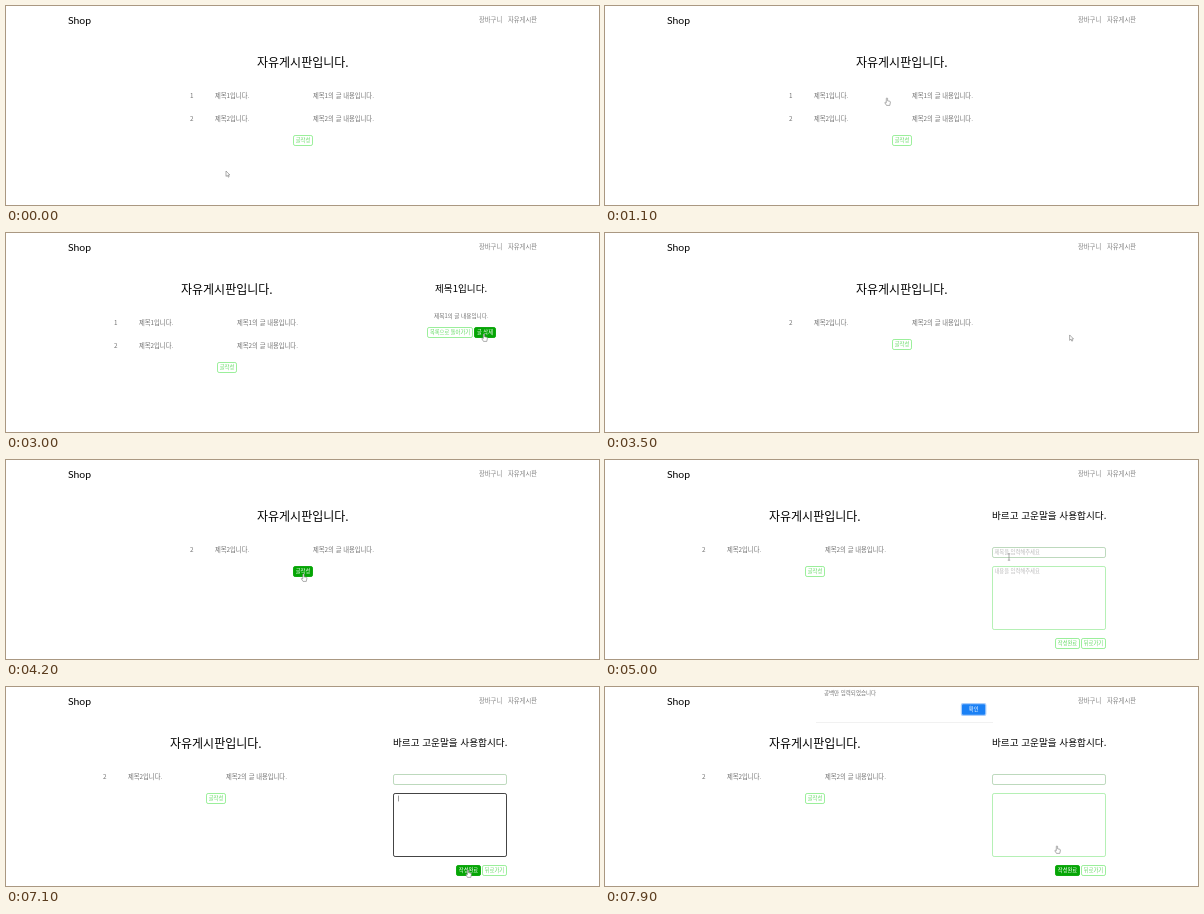
An HTML page that plays this animation: 593 by 199 pixels, repeating every 8 s.

```html
<!DOCTYPE html>
<html lang="ko">
<head>
<meta charset="utf-8">
<style>
  html, body { margin: 0; width: 100%; height: 100%; overflow: hidden; background: #fff; }
  svg { display: block; width: 593px; height: 199px; }
  text { font-family: "Noto Sans CJK KR", "Noto Sans CJK", sans-serif; fill: #707070; white-space: pre; }
  .head { fill: #000; font-weight: 500; }
  .brand { font-family: Lato, "Open Sans", sans-serif; fill: #000; }
  .nav { fill: #808080; }
  .hint { fill: #bbb; }
  .btn rect { fill: #fff; stroke: #90ee90; stroke-width: .9; }
  .btn text { fill: #62da62; text-anchor: middle; }
  .btn.on rect { fill: #05a505; stroke: #05a505; }
  .btn.on text { fill: #fff; }
  .field { fill: #fff; stroke: #a8eea8; stroke-width: .85; }
  .field.gray { stroke: #b2d2b2; }
  .field.focus { stroke: #444; stroke-width: 1; }
  .cursor path { fill: #fff; stroke: #777; stroke-width: .6; stroke-linejoin: round; }
</style>
</head>
<body>
<svg id="stage" viewBox="0 0 593 199"></svg>
<script>
const LOOP = 8000;
const stage = document.getElementById('stage');

function el(parent, tag, attrs = {}) {
  const node = document.createElementNS('http://www.w3.org/2000/svg', tag);
  for (const k in attrs) node.setAttribute(k, attrs[k]);
  return parent.appendChild(node);
}
const group = (parent, cls = '') => el(parent, 'g', { class: cls });
const show = (node, on) => node.setAttribute('visibility', on ? 'inherit' : 'hidden');

// Text placed by its left edge and vertical centre.
function label(parent, x, cy, size, str, cls = '') {
  const t = el(parent, 'text', { x, y: cy + size * 0.37, 'font-size': size, class: cls });
  t.textContent = str;
  return t;
}

function button(parent, x, y, w, str) {
  const g = group(parent, 'btn');
  el(g, 'rect', { x: x + .5, y: y + .5, width: w - 1, height: 10, rx: 1.6 });
  label(g, x + w / 2, y + 5.5, 5.25, str);
  return { g, x, y, w, h: 11 };
}

function field(parent, x, y, w, h, hint, cls) {
  const box = el(parent, 'rect', { x: x + .5, y: y + .5, width: w - 1, height: h - 1, rx: 1.6, class: cls });
  const text = label(parent, x + 2.5, y + 5.4, 5.3, hint, 'hint');
  const caret = el(parent, 'rect', { x: x + 3, y: y + 2.6, width: .6, height: 5.8, fill: '#555' });
  return { box, text, caret, x, y, w, h };
}

// Header
label(stage, 62, 14.3, 10.4, 'Shop', 'brand');
label(stage, 473, 14, 6.3, '장바구니', 'nav');
label(stage, 502, 14, 6.3, '자유게시판', 'nav');

// List
const list = group(stage);
label(list, 251, 56.5, 12, '자유게시판입니다.', 'head');
const rows = [1, 2].map(n => {
  const g = group(list);
  label(g, 184, 90, 6.3, n);
  label(g, 209, 90, 6.3, `제목${n}입니다.`);
  label(g, 307, 90, 6.3, `제목${n}의 글 내용입니다.`);
  return g;
});
const write = button(list, 287, 129, 20, '글작성');

// Detail
const detail = group(stage);
label(detail, 429, 55, 9.6, '제목1입니다.', 'head');
label(detail, 428, 82.5, 5.65, '제목1의 글 내용입니다.');
const back = button(detail, 421, 94, 46, '목록으로 돌아가기');
const remove = button(detail, 468, 94, 22, '글 삭제');

// Form
const form = group(stage);
label(form, 387, 55, 9.65, '바르고 고운말을 사용합시다.', 'head');
const subject = field(form, 387, 87, 114, 11, '제목을 입력해주세요', 'field gray');
const body = field(form, 387, 106, 114, 64, '내용을 입력해주세요', 'field');
const done = button(form, 450, 178, 25, '작성완료');
const cancel = button(form, 476, 178, 25, '뒤로가기');

// Alert
const alertBox = group(stage);
el(alertBox, 'rect', { x: 211, y: -4, width: 177, height: 40, fill: '#f1f1f1' });
el(alertBox, 'rect', { x: 211, y: -4, width: 177, height: 39, fill: '#fff' });
label(alertBox, 219, 6.3, 5.5, '공백만 입력되었습니다');
el(alertBox, 'rect', { x: 355.8, y: 16, width: 25.6, height: 13, rx: 2, fill: '#a9cdfb' });
el(alertBox, 'rect', { x: 357, y: 17.2, width: 23.2, height: 10.6, rx: 1.2, fill: '#1a80f5' });
label(alertBox, 363.8, 22.4, 5.3, '확인').style.fill = '#fff';

// Pointer
const cursor = group(stage, 'cursor');
const shapes = {
  arrow: 'M0 0V5.4L1.3 4.3L2.2 6.2L3.1 5.8L2.2 4H3.9Z',
  hand: 'M-.7 .3Q0 -.6 .6 .3V2.8L2.9 3.3Q3.5 3.5 3.4 4.3L2.8 7.4H-.5L-2.2 4.7Q-1.8 3.9 -.7 4.7Z',
  beam: 'M-1.2 -3.2H1.2M0 -3.2V3.2M-1.2 3.2H1.2'
};
for (const k in shapes) shapes[k] = el(cursor, 'path', { d: shapes[k] });

// Pointer stops: time, x, y
const stops = [
  [0, 220, 165], [300, 214, 110], [500, 240, 57], [700, 350, 75], [900, 283, 93], [1100, 282, 92],
  [1600, 282, 92], [1800, 150, 85], [1900, 230, 54], [2000, 365, 95], [2300, 440, 120],
  [2500, 481, 128], [2700, 478, 101], [3400, 478, 101], [4000, 297.5, 114], [4300, 297.5, 114],
  [4500, 208, 100], [4700, 320, 58], [4850, 494, 170], [5000, 404, 97], [5400, 404, 97],
  [6000, 463, 177], [6400, 451, 150], [6700, 451, 150], [7000, 462, 183], [7500, 462, 183],
  [7900, 452, 159], [8000, 452, 159]
];

function pointerAt(t) {
  const i = stops.findIndex(s => s[0] > t);
  const [t0, x0, y0] = stops[i - 1], [t1, x1, y1] = stops[i];
  const p = (t - t0) / (t1 - t0), e = p * p * (3 - 2 * p);
  return [x0 + (x1 - x0) * e, y0 + (y1 - y0) * e];
}

const within = (a, t, b) => t >= a && t < b;
const hit = (r, px, py, dx = 0, dy = 0) =>
  within(r.x + dx, px, r.x + dx + r.w) && within(r.y + dy, py, r.y + dy + r.h);

function setField(f, focused, empty, spaces, blinkFrom, t) {
  f.box.classList.toggle('focus', focused);
  show(f.text, empty);
  show(f.caret, focused && (t - blinkFrom) % 1000 < 500);
  f.caret.setAttribute('x', f.x + 3 + spaces * 1.2);
}

function draw(t) {
  const inDetail = within(1400, t, 3300), inForm = t >= 4300;
  const deleted = t >= 3300, alerted = t >= 7500;
  const dx = inDetail ? -76 : inForm ? -87 : 0;
  const dy = deleted ? -23 : 0;
  const [x, y] = pointerAt(t);

  list.setAttribute('transform', `translate(${dx} 0)`);
  show(rows[0], !deleted);
  rows[1].setAttribute('transform', `translate(0 ${23 + dy})`);
  write.g.setAttribute('transform', `translate(0 ${dy})`);
  show(detail, inDetail);
  show(form, inForm);
  show(alertBox, alerted);

  const over = {
    write: hit(write, x, y, dx, dy),
    back: inDetail && hit(back, x, y),
    remove: inDetail && hit(remove, x, y),
    done: inForm && (alerted || hit(done, x, y)),
    cancel: inForm && !alerted && hit(cancel, x, y)
  };
  const buttons = { write, back, remove, done, cancel };
  for (const k in buttons) buttons[k].g.classList.toggle('on', over[k]);

  setField(subject, within(5200, t, 6500), t < 5500, t < 5500 ? 0 : 2, t < 6000 ? 5200 : 6000, t);
  setField(body, within(6500, t, 7300), t < 6800, t < 6800 ? 0 : 2, t < 6800 ? 6500 : 6800, t);

  const onRow = !inForm && hit({ x: 180, y: 85, w: 190, h: deleted ? 10 : 33 }, x, y, dx);
  const onField = inForm && (hit(subject, x, y) || hit(body, x, y));
  const kind = onRow || Object.values(over).some(Boolean) ? 'hand' : onField ? 'beam' : 'arrow';
  for (const k in shapes) show(shapes[k], k === kind);
  cursor.setAttribute('transform', `translate(${x} ${y})`);
}

const start = performance.now();
function tick() {
  const t = (performance.now() - start) % LOOP;
  draw(Math.floor(t / 100) * 100);
  requestAnimationFrame(tick);
}
tick();
</script>
</body>
</html>
```
